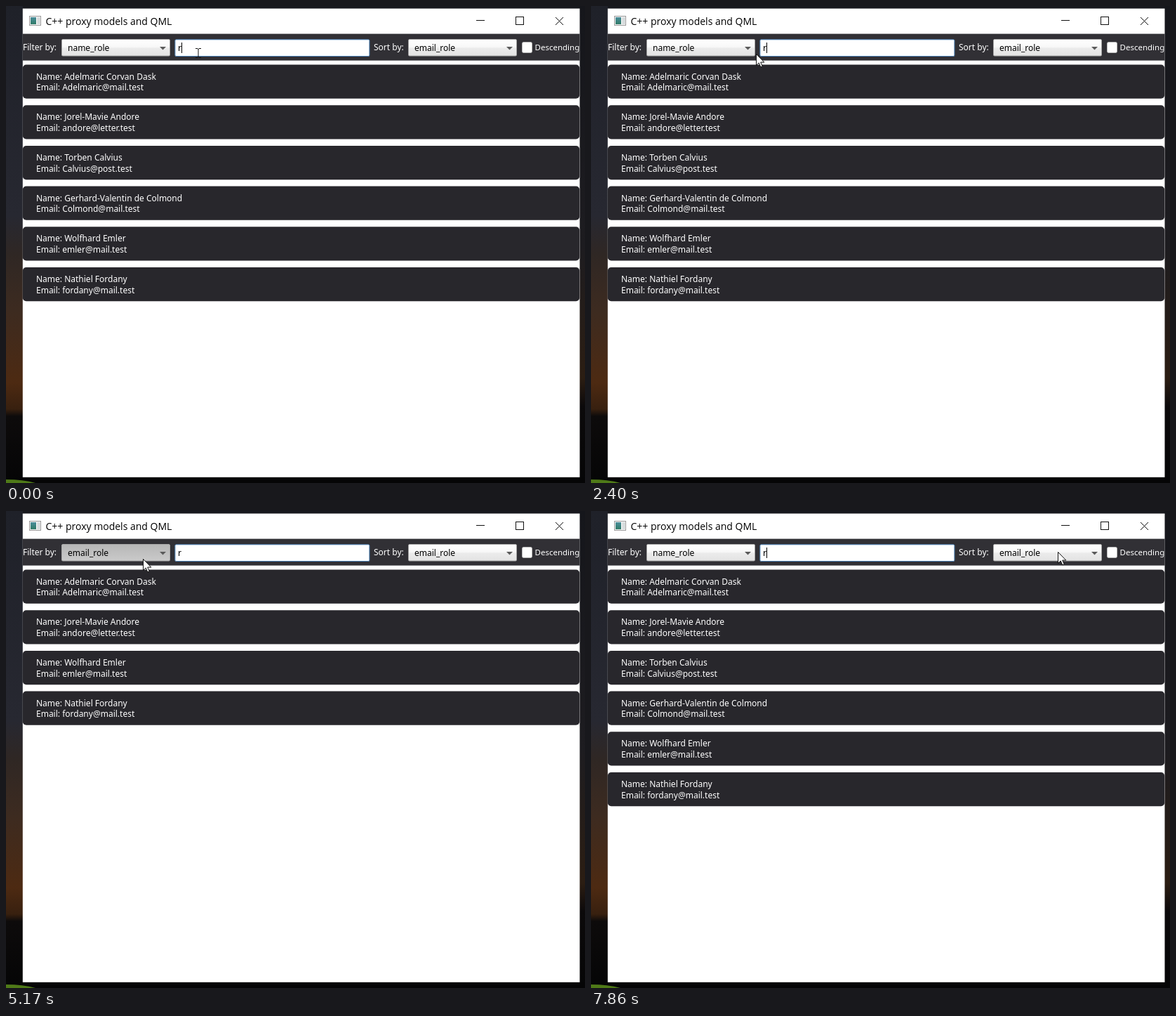
An HTML page that plays this animation: 825 by 679 pixels, repeating every 7.99 s.

```html
<!DOCTYPE html>
<html lang="en">
<head>
<meta charset="utf-8">
<title>C++ proxy models and QML</title>
<style>
html, body { margin: 0; width: 100%; height: 100%; overflow: hidden; background: #08080a; }
svg { display: block; }
text { font: 12px "Noto Sans", "Open Sans", sans-serif; white-space: pre; }
.ui { font: 14px "Open Sans", "Noto Sans", sans-serif; }
.menu { font-size: 13.7px; }
.light { fill: #fff; }
</style>
</head>
<body>
<svg width="825" height="679" viewBox="0 0 825 679">
  <defs>
    <linearGradient id="sky" x2="0" y2="1">
      <stop offset="0" stop-color="#1f2129"/>
      <stop offset=".44" stop-color="#272831"/>
      <stop offset=".52" stop-color="#2f2724"/>
      <stop offset=".64" stop-color="#3d2b20"/>
      <stop offset=".79" stop-color="#4d2a12"/>
      <stop offset=".845" stop-color="#38200f"/>
      <stop offset=".86" stop-color="#0d0b0b"/>
      <stop offset="1" stop-color="#050506"/>
    </linearGradient>
    <linearGradient id="edge" x2="0" y2="1">
      <stop offset="0" stop-color="#15161b"/>
      <stop offset=".5" stop-color="#1d1c20"/>
      <stop offset=".78" stop-color="#2b1d12"/>
      <stop offset=".84" stop-color="#0b090a"/>
      <stop offset="1" stop-color="#050506"/>
    </linearGradient>
    <linearGradient id="idle" x2="0" y2="1">
      <stop offset="0" stop-color="#fefefe"/>
      <stop offset=".45" stop-color="#f8f8f8"/>
      <stop offset=".55" stop-color="#ebebeb"/>
      <stop offset="1" stop-color="#e3e3e3"/>
    </linearGradient>
    <linearGradient id="dark" x2="0" y2="1">
      <stop offset="0" stop-color="#b6b6b6"/>
      <stop offset="1" stop-color="#cacaca"/>
    </linearGradient>
    <linearGradient id="teal" x2="0" y2="1">
      <stop offset="0" stop-color="#4c8f9c"/>
      <stop offset="1" stop-color="#2f7a66"/>
    </linearGradient>
  </defs>
  <rect width="24" height="679" fill="url(#sky)"/>
  <rect x="817" width="8" height="679" fill="url(#edge)"/>
  <rect x="24" width="793" height="4" fill="#17181d"/>
  <rect y="671" width="825" height="8" fill="#050506"/>
  <path d="M0 674Q24 674 42 679H0z" fill="#4f7a18"/>
  <rect x="23.8" y="3.6" width="793.7" height="667.2" fill="#fff"/>
  <rect x="23.8" y="39.6" width="793.7" height="38" fill="#313035"/>

  <rect x="33.5" y="14.5" width="16" height="13" fill="#f4f4f4" stroke="#9a9a9a"/>
  <rect x="35" y="16" width="8" height="10" fill="url(#teal)"/>
  <path d="M45.5 16v10M47.5 16v10" stroke="#b9c3c6"/>
  <text class="ui" x="56.5" y="27">C++ proxy models and QML</text>
  <g fill="none" stroke="#111">
    <path d="M670 20.5h12"/>
    <rect x="726.5" y="15.5" width="11" height="11"/>
    <path d="M783 16l11 11M794 16l-11 11"/>
  </g>

  <g class="light">
    <text x="24" y="63">Filter by:</text>
    <text x="524" y="63">Sort by:</text>
    <text x="753.5" y="63" style="font-size:11.5px">Descending</text>
  </g>
  <rect x="735.5" y="51.5" width="14" height="15" rx="2" fill="#fff" stroke="#b8b8b8"/>
  <rect x="240.9" y="47.8" width="277" height="23.7" rx="1.5" fill="#fff" stroke="#4a7fb5"/>
  <g id="live"></g>
</svg>
<script>
const LOOP = 7990;
const people = [
  ["Adelmaric Corvan Dask", "Adelmaric@mail.test"],
  ["Jorel-Mavie Andore", "andore@letter.test"],
  ["Torben Calvius", "Calvius@post.test"],
  ["Gerhard-Valentin de Colmond", "Colmond@mail.test"],
  ["Wolfhard Emler", "emler@mail.test"],
  ["Nathiel Fordany", "fordany@mail.test"]
];
const roles = ["name_role", "email_role"];

// Pointer key points: time, x, y
const path = [
  [130, 274, 67], [260, 291, 77], [520, 279, 77], [800, 217, 72], [1320, 235, 68],
  [3100, 235, 68], [3600, 203, 54], [3860, 203, 57], [4250, 197, 102], [4800, 197, 102],
  [5170, 195, 68], [5440, 188, 51], [6000, 218, 72], [6250, 208, 54], [6840, 204, 80],
  [7100, 204, 80], [7350, 330, 84], [7730, 661, 68], [7860, 665, 58]
];
// Each menu visit: press on the box, press on an item
const visits = [[3590, 4490], [6300, 6960]];
const HOLD = 140, PITCH = 57.67, ROW = 23.5;

const within = (t, a, b) => t >= a && t < b;
const rect = (x, y, w, h, fill, more = "") =>
  `<rect x="${x}" y="${y}" width="${w}" height="${h}" fill="${fill}" ${more}/>`;
const text = (x, y, s, cls = "") => `<text x="${x}" y="${y}" class="${cls}">${s}</text>`;

function pointerAt(t) {
  const next = path.findIndex(p => p[0] > t);
  if (next < 1) return path.at(next).slice(1);
  const [t0, x0, y0] = path[next - 1], [t1, x1, y1] = path[next];
  const u = (t - t0) / (t1 - t0), e = u * u * (3 - 2 * u);
  return [Math.round(x0 + (x1 - x0) * e), Math.round(y0 + (y1 - y0) * e)];
}

function card([name, email], i) {
  const y = 83.6 + i * PITCH;
  return rect(23.8, y, 793.4, 48.2, "#28272c", 'rx="5"') +
    text(43, y + 21.2, "Name: " + name, "light") +
    text(43, y + 36.6, "Email: " + email, "light");
}

function combo(x, role, dark) {
  return rect(x + .5, 47.5, 154, 23.5, `url(#${dark ? "dark" : "idle"})`, 'rx="1.5" stroke="#a8a8a8"') +
    text(x + 9, 64, roles[role]) +
    `<path d="M${x + 140} 58h9l-4.5 4.5z" fill="#5a5a5a"/>`;
}

function menu(checked, y) {
  const hover = Math.floor((y - 74) / ROW);
  const top = i => 74 + i * ROW;
  return rect(80, 73, 159, 52, "#000", 'opacity=".25"') +
    rect(79.5, 71.5, 158, 52, "#f0f0f0", 'stroke="#a5a5a5"') +
    (hover >= 0 ? rect(82, top(hover), 153, ROW, "#91c9f7") : "") +
    rect(82, top(checked), 23, ROW, "#91c9f7") +
    `<path d="M87.5 ${top(checked) + 12}l4 4 7.5 -8" fill="none" stroke="#222" stroke-width="1.4"/>` +
    roles.map((r, i) => text(114, top(i) + 17, r, "ui menu")).join("");
}

const beam = x =>
  `<path d="M${x - 4} 60.5h3l1 1 1 -1h3M${x} 61v12M${x - 4} 73.5h3l1 -1 1 1h3" fill="none" stroke="#111"/>`;
const arrow = (x, y) =>
  `<path transform="translate(${x + .5} ${y + .5})"
    d="M0 0V16L3.7 12.5 6.3 18.3 8.7 17.2 6.2 11.6H11.3z" fill="#fff" stroke="#111"/>`;
const ring = (x, y) =>
  `<circle cx="${x + 1}" cy="${y + 4}" r="10" fill="none" stroke="#222"/>`;

function scene(t) {
  const [x, y] = pointerAt(t);
  const query = within(t, 130, 2400) ? "re" : "r";
  const role = within(t, visits[0][1] + HOLD, visits[1][1] + HOLD - 10) ? 1 : 0;
  const open = visits.some(([a, b]) => within(t, a + HOLD / 2, b + HOLD - 10) || t === a);
  const hover = within(x, 79, 232) && within(y, 48, 69);
  const pressed = visits.flat().some(p => within(t, p, p + HOLD - 10));
  // Typing restarts the caret's blink
  const caret = t < 2400 ? (t - 130) % 1140 < 570 : (t - 2280) % 1040 < 520;
  return people.filter(p => p[role].includes(query)).map(card).join("") +
    combo(79, role, open || hover) + combo(573, 1, false) +
    text(245, 64, query) +
    (caret ? rect(query === "re" ? 257 : 250, 52, 1, 15, "#000") : "") +
    (open ? menu(role, y) : "") +
    (pressed ? ring(x, y) : "") +
    (t < 260 ? beam(274) : arrow(x, y));
}

const live = document.getElementById("live");
let shown;
function frame(now) {
  const next = scene(now % LOOP);
  if (next !== shown) live.innerHTML = shown = next;
  requestAnimationFrame(frame);
}
frame(0);
</script>
</body>
</html>
```
